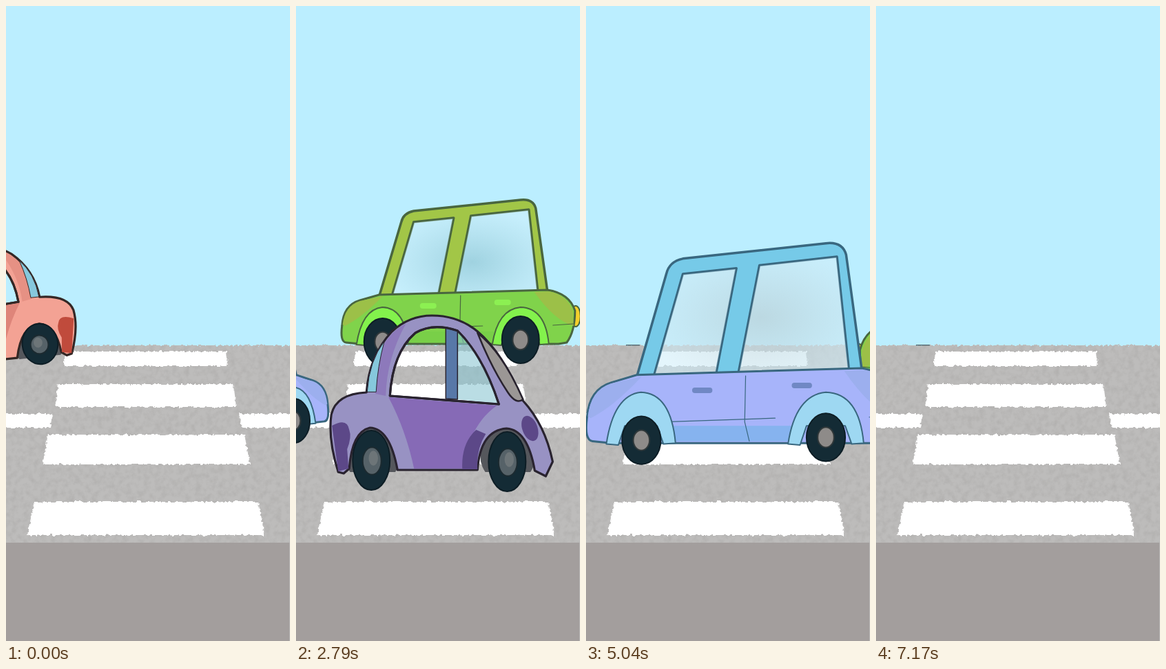
Animation of 412 by 917 pixels, one loop 7.21 s. Source, as an HTML page:

```html
<!DOCTYPE html>
<html lang="en">
<head>
<meta charset="utf-8">
<title>Cars at a crossing</title>
<style>
  html, body { margin: 0; width: 100%; height: 100%; overflow: hidden; background: #bbeeff; }
  svg { display: block; width: 100vw; height: 100vh; }
  .car * { vector-effect: non-scaling-stroke; stroke-linejoin: round; stroke-linecap: round; }
</style>
</head>
<body>
<svg viewBox="0 0 412 917" preserveAspectRatio="none">
  <defs>
    <filter id="rough" x="-5%" y="-5%" width="110%" height="110%" color-interpolation-filters="sRGB">
      <feTurbulence type="fractalNoise" baseFrequency=".22" numOctaves="2" seed="4"/>
      <feDisplacementMap in="SourceGraphic" scale="6" xChannelSelector="R" yChannelSelector="G"/>
    </filter>
    <filter id="grain" x="0" y="0" width="100%" height="100%" color-interpolation-filters="sRGB">
      <feTurbulence type="fractalNoise" baseFrequency=".12" numOctaves="4" seed="9"/>
      <feColorMatrix values="0 0 0 0 .5  0 0 0 0 .49  0 0 0 0 .48  .35 0 0 0 -.13"/>
    </filter>
    <radialGradient id="teal" cx=".55" cy=".6" r=".6">
      <stop offset="0" stop-color="#96c9d6" stop-opacity=".75"/>
      <stop offset="1" stop-color="#cdeffa" stop-opacity=".6"/>
    </radialGradient>
    <radialGradient id="mist" cx=".55" cy=".5" r=".6">
      <stop offset="0" stop-color="#bccfd5" stop-opacity=".7"/>
      <stop offset="1" stop-color="#d2effa" stop-opacity=".6"/>
    </radialGradient>
  </defs>
  <rect width="412" height="917" fill="#bbeeff"/>
  <rect x="-10" y="490" width="432" height="300" fill="#bdbcbb" filter="url(#rough)"/>
  <rect y="491" width="412" height="284" filter="url(#grain)"/>
  <g fill="#fff" filter="url(#rough)">
    <path d="M86 499H320L322 520H84ZM76 546H330L334 579H71ZM61 619H346L354 662H53ZM41 716H366L375 764H31Z"/>
    <path d="M-9 589H67L64 609H-9ZM338 589H421V609H342Z"/>
  </g>
  <rect y="775" width="411" height="142" fill="#a39e9d"/>
  <rect x="411" y="775" width="1" height="142" fill="#b9b6b5"/>
  <rect id="dash" x="58" y="489" width="20" height="1.5" fill="#566a70"/>
  <circle id="dot" cx="347.500" cy="386" r="3.700" fill="#a8d8e8" stroke="#94c4d6"/>
  <g id="cars"></g>
</svg>
<script>
const LOOP = 7210, TICK = 1000 / 24;
const $ = id => document.getElementById(id);

const path = (d, fill, stroke = 'none', w = 2, extra = '') =>
  `<path d="${d}" fill="${fill}" stroke="${stroke}" stroke-width="${w}" ${extra}/>`;
const oval = (x, y, rx, ry, fill, extra = '') =>
  `<ellipse cx="${x}" cy="${y}" rx="${rx}" ry="${ry}" fill="${fill}" ${extra}/>`;

// Both bodies face right; their pivot is the rear end at axle height.
const BOX = { px: 65, py: 482, draw: (c, rx, ry) => {
  const cabin = 'M120 419L152 312Q155 299 170 296L325 280Q343 278 347 292L364 412Z';
  const rear = 'M170 312L228 306L205 420L138 420Z';
  const front = 'M253 303L337 294L350 412L230 416Z';
  const body = 'M120 417L92 425Q68 432 66 462Q63 485 72 486L92 488L380 488L392 486Q404 470 404 440Q396 415 364 410Z';
  const wheel = (x, y) =>
    oval(x, y, rx, ry, '#142b35', 'stroke="#0d1d25" stroke-width="2"') +
    oval(x, y, rx * .42, ry * .42, '#8e8b89', 'stroke="#30383a" stroke-width="2"');
  const arch = (l, r) =>
    path(`M${l} 489Q${l + 8} 438 ${(l + r) / 2} 435Q${r - 5} 436 ${r} 488L${r - 13} 489L${r - 20} 470L${l + 20} 470L${l + 13} 490Z`, c.arch, c.line);
  return oval(405, 448, 7, 15, '#f4cf2c', `stroke="${c.line}" stroke-width="2"`) +
    path(cabin + rear + front, c.top, c.line, 3.5, 'fill-rule="evenodd"') +
    path(rear + front, c.glass, c.line, 2) +
    path(body, c.low, c.line, 3) +
    path('M92 426Q70 433 67 460L70 462Q95 450 125 419Z', c.patch) +
    path('M366 412Q392 417 401 440L402 462Q375 455 345 413Z', c.patch) +
    path('M140 470H290V486H140Z', c.sill) +
    path('M238 418L237 466L242 486M150 466L270 462M372 461L402 459', 'none', c.line, 1.2) +
    path('M183 433H199M291 428H307', 'none', c.knob, 8) +
    arch(87, 162) + arch(284, 366) + wheel(125, 485) + wheel(325, 482);
} };

const BEETLE = { px: 50, py: 657, draw: (c, rx, ry, lift) => {
  const body = 'M62 673Q47 625 52 590Q59 560 103 558Q107 505 140 470Q165 447 198 447Q236 447 264 470' +
    'Q300 500 330 570Q362 605 373 658L363 679L347 671Q337 612 306 610Q268 613 264 670L148 670Q137 610 108 609Q82 615 78 668L70 675Z';
  const glass = 'M137 563Q141 500 174 472Q200 457 235 469Q272 505 295 575Z';
  const wheel = (x, y) =>
    oval(x, y, rx, ry, '#142b35', 'stroke="#0d1d25" stroke-width="2"') +
    oval(x + 1, y + 1, rx * .5, ry * .46, '#566268', 'stroke="#1c2a30" stroke-width="2"') +
    oval(x + 3, y - 3, rx * .25, ry * .25, '#6d7578');
  const well = x => oval(x, 650, 40, 40, '#55575c', 'clip-path="inset(0 0 17px 0)"');
  return well(112) + well(308) +
    path(body + glass, c.light, c.line, 3.2, 'fill-rule="evenodd"') +
    path('M135 565L292 577Q252 605 243 668H172Q160 612 135 565Z', c.main) +
    path('M128 489Q142 467 160 459Q132 510 131 563L116 560Q115 520 128 489Z', c.main, 'none', 0, 'opacity=".6"') +
    path('M104 557Q107 512 129 484Q119 520 117 557Z', '#86c8dc', c.line, 1) +
    path('M53 606Q75 594 78 612Q82 622 75 640L77 668L62 672Z', c.dark) +
    path('M262 612L276 618Q262 640 264 669H242Q240 632 262 612Z', c.dark) +
    path('M235 470Q272 505 293 574L235 568Z', '#8cc6d2', 'none', 0, 'opacity=".6"') +
    path('M218 465L235 469V568L218 567Z', '#5878a8', c.line, 1.5) +
    path(glass, 'none', c.line, 3) +
    path('M264 472Q300 500 330 568Q320 576 308 558Q284 522 264 472Z', '#9b9795', c.line, 2.5) +
    oval(340, 610, 11, 19, c.dark, 'transform="rotate(-20 340 610)"') +
    c.door + wheel(110, 656 - lift) + wheel(307, 658 - lift);
} };

const GREEN = { top: '#a2c647', low: '#80d34b', patch: '#9cc048', sill: '#79cf48', arch: '#83f24c',
  knob: '#8cf052', line: '#49663f', glass: 'url(#teal)' };
const BLUE = { top: '#76cae8', low: '#a7b4fa', patch: '#9cafee', sill: '#86b3ef', arch: '#9ed8f2',
  knob: '#7088c4', line: '#39677f', glass: 'url(#mist)' };
const PURPLE = { light: '#9892c3', main: '#866ab6', dark: '#5c4888', line: '#29232f', door: '' };
const RED = { light: '#f3a294', main: '#de857a', dark: '#c04b3c', line: '#342725',
  door: path('M224 576V668', 'none', '#b1574d', 1.2) + path('M182 602H204', 'none', '#bd4d40', 11) };

// Tyre: radii and, for beetles, lift. Keys: time, x, y, scale x, scale y, tilt.
// Motion continues straight past the first and last key.
const cars = [
  { kind: BEETLE, look: RED, tyre: [28, 39, 8], phase: 0,
    keys: [[0, 105, 489, -.92, .75, -6], [1000, 553, 511, -.86, .88, 0]] },
  { kind: BEETLE, look: RED, tyre: [28, 39, 8], phase: 1,
    keys: [[3420, 28, 502, -.92, .75, -6], [4420, 478, 511, -.86, .88, 0]] },
  { kind: BOX, look: GREEN, tyre: [27, 34], phase: 1,
    keys: [[1792, -282, 484, 1, 1, 0], [2790, 65, 482, 1, 1, 0], [3420, 341, 485, 1, 1, 0]] },
  { kind: BOX, look: GREEN, tyre: [25, 27], phase: 1,
    keys: [[5100, 715, 553, -1, 1.27, 0], [5667, 507, 580, -1, 1.27, 0], [6880, 80, 593, -1, 1.27, 0]] },
  { kind: BOX, look: BLUE, tyre: [28, 33], phase: 0,
    keys: [[1880, 301, 591, -.84, .97, 0], [2750, 47, 596, -.84, .97, 0]] },
  { kind: BOX, look: BLUE, tyre: [21, 25], phase: 2,
    keys: [[4333, -237, 612, 1.27, 1.41, 0], [5710, 285, 636, 1.42, 1.36, 0]] },
  { kind: BEETLE, look: PURPLE, tyre: [27, 43, 0], phase: 1,
    keys: [[1880, 420, 642, 1, 1, 0], [2790, 50, 657, 1, 1, 0], [3420, -250, 655, 1.18, 1, 0]] }
];

for (const car of cars) {
  car.node = document.createElementNS('http://www.w3.org/2000/svg', 'g');
  car.node.setAttribute('class', 'car');
  car.node.innerHTML = car.kind.draw(car.look, ...car.tyre);
  $('cars').append(car.node);
}

function pose(keys, t) {
  let i = 0;
  while (i < keys.length - 2 && t > keys[i + 1][0]) i++;
  const [a, b] = [keys[i], keys[i + 1]];
  const k = (t - a[0]) / (b[0] - a[0]);
  return a.map((v, n) => v + (b[n] - v) * k);
}

function draw(now) {
  const t = now % LOOP, tick = Math.floor(t / TICK + .1);
  for (const { kind, keys, phase, node } of cars) {
    // each car is drawn on every third tick
    const held = tick - (tick - phase + 3) % 3;
    const [, x, y, sx, sy, tilt] = pose(keys, held * TICK);
    node.setAttribute('transform',
      `translate(${x} ${y}) rotate(${tilt}) scale(${sx} ${sy}) translate(${-kind.px} ${-kind.py})`);
  }
  $('dash').style.display = t > 3100 ? '' : 'none';
  $('dot').style.display = t > 1790 && t < 2290 ? '' : 'none';
}

const start = performance.now();
(function loop() {
  draw(performance.now() - start);
  requestAnimationFrame(loop);
})();
</script>
</body>
</html>
```
